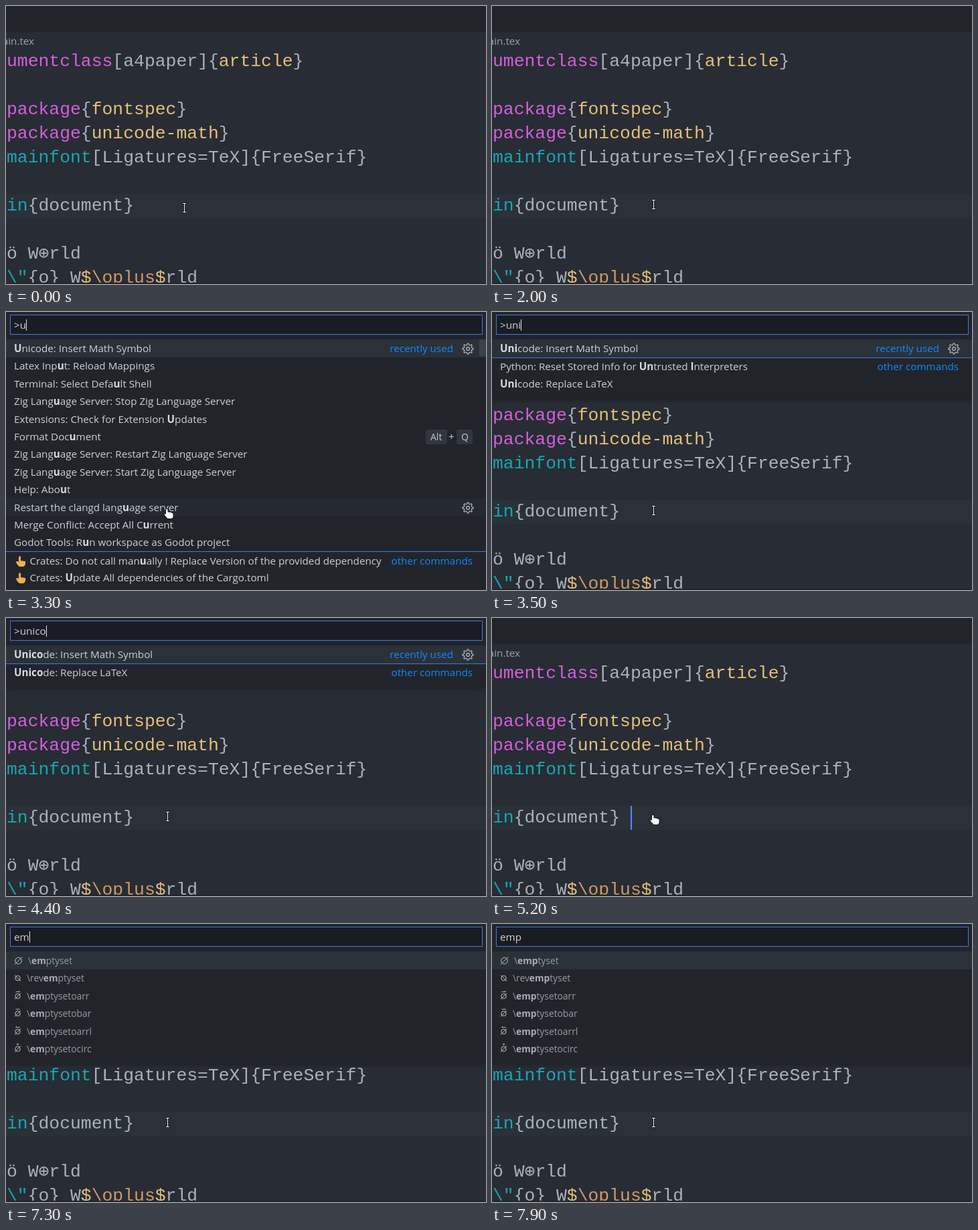
Animation of 717x416 px, one loop 8000 ms. Source, as an HTML page with a canvas:

```html
<!DOCTYPE html>
<html>
<head>
<meta charset="utf-8">
<style>
html, body { margin: 0; width: 100%; height: 100%; overflow: hidden; background: #282c34; }
canvas { display: block; }
</style>
</head>
<body>
<canvas id="stage" width="717" height="416"></canvas>
<script>
const ctx = document.getElementById('stage').getContext('2d');
const UI = '"Open Sans", "Noto Sans", "DejaVu Sans", sans-serif';
const MONO = '26.4px "Liberation Mono", "DejaVu Sans Mono", monospace';
const ROW = 26.4;
const GREY = '#abb2bf', PINK = '#d55fde', GOLD = '#e5c07b', TEAL = '#16a8b3', ORANGE = '#d19a66';
const BORDER = '#4677dc', LINK = '#128aff';

// Code lines: line number, then text and colour in turn
const code = [
  [0, 'umentclass', PINK, '[a4paper]{', GREY, 'article', GOLD, '}', GREY],
  [2, 'package', PINK, '{', GREY, 'fontspec', GOLD, '}', GREY],
  [3, 'package', PINK, '{', GREY, 'unicode-math', GOLD, '}', GREY],
  [4, 'mainfont', TEAL, '[Ligatures=TeX]{FreeSerif}', GREY],
  [6, 'in', TEAL, '{document}', GREY],
  [8, 'ö W⊕rld', GREY],
  [9, '\\"', TEAL, '{o} W', GREY, '$', GOLD, '\\oplus', ORANGE, '$', GOLD, 'rld', GREY]
];

const insert = 'Unicode: Insert Math Symbol', replace = 'Unicode: Replace LaTeX';
const python = 'Python: Reset Stored Info for Untrusted Interpreters';
const run = 'Godot Tools: Run workspace as Godot project';
const commands = [
  insert,
  'Latex Input: Reload Mappings',
  'Terminal: Select Default Shell',
  'Zig Language Server: Stop Zig Language Server',
  'Extensions: Check for Extension Updates',
  'Format Document',
  'Zig Language Server: Restart Zig Language Server',
  'Zig Language Server: Start Zig Language Server',
  'Help: About',
  'Restart the clangd language server',
  'Merge Conflict: Accept All Current',
  run,
  'Crates: Do not call manually ! Replace Version of the provided dependency',
  'Crates: Update All dependencies of the Cargo.toml'
];
const symbols = '´H ŁL ØO ¶P §S ¸c ˛k łl øo ˘u ÅAA ÆAE ÐDH ĐDJ'.split(' ');
const symbolsE = 'ÆAE ŒOE ℜRe æae ≥ge ≤le ≠ne œoe °deg ℓell ηeta ≥geq ≤leq ¬neg'.split(' ');
const empties = ['emptyset', 'revemptyset', 'emptysetoarr', 'emptysetobar', 'emptysetoarrl', 'emptysetocirc'];

// Time, palette input (null = closed), caret shown
const states = [
  [0, null, 0], [600, null, 1], [1100, null, 0], [1600, null, 1], [2000, null, 0],
  [2100, '>', 1], [2700, '>', 0], [3300, '>u', 1], [3400, '>un', 1], [3500, '>uni', 1],
  [4100, '>unic', 1], [4400, '>unico', 1], [4600, '>unicod', 1], [5100, '>unicod', 0],
  [5200, null, 1], [5300, '', 1], [5900, '', 0], [6400, '', 1],
  [7000, 'e', 1], [7300, 'em', 1], [7400, 'emp', 1], [7900, 'emp', 0]
];
const mouse = [
  [0, 266, 302], [400, 262, 345], [500, 250, 383], [600, 241, 313],
  [900, 241, 306], [1000, 241, 300], [1100, 241, 298], [1400, 241, 297]
];
const at = (list, t) => list.filter(s => s[0] <= t).pop();

function rect(x, y, w, h, color) {
  ctx.fillStyle = color;
  ctx.fillRect(x, y, w, h);
}

function text(str, x, y, color, font) {
  ctx.font = font || `15.2px ${UI}`;
  ctx.fillStyle = color;
  ctx.fillText(str, x, y);
  return x + ctx.measureText(str).width;
}

function textRight(str, x, y, color) {
  ctx.textAlign = 'right';
  text(str, x, y, color);
  ctx.textAlign = 'left';
}

function circle(x, y, r, color, width = 1) {
  ctx.strokeStyle = color;
  ctx.lineWidth = width;
  ctx.beginPath();
  ctx.arc(x, y, r, 0, 7);
  ctx.stroke();
}

function line(color, width, ...pts) {
  ctx.strokeStyle = color;
  ctx.lineWidth = width;
  ctx.beginPath();
  for (let i = 0; i < pts.length; i += 2) ctx.lineTo(pts[i], pts[i + 1]);
  ctx.stroke();
}

function shape(d, x, y, fill, outline) {
  const p = new Path2D(d);
  ctx.save();
  ctx.translate(x, y);
  if (outline) {
    ctx.strokeStyle = outline;
    ctx.lineWidth = 2;
    ctx.stroke(p);
  }
  ctx.fillStyle = fill;
  ctx.fill(p);
  ctx.restore();
}

// Draws a label with the matched parts in bold
function label(str, query, x, y, color, bold, size = 15.2) {
  const i = str.toLowerCase().indexOf(query);
  let parts = i < 0 || !query ? [str]
    : [str.slice(0, i), str.substr(i, query.length), str.slice(i + query.length)];
  if (str === python && query === 'uni') parts = str.split(/(Un|I(?=nterp))/);
  parts.forEach((p, k) => {
    x = text(p, x, y, k % 2 ? bold : color, `${k % 2 ? 700 : 400} ${size}px ${UI}`);
  });
}

function gear(y) {
  const c = '#c5c9d0', pts = [];
  for (let i = 0; i <= 32; i++) {
    const a = (i - 0.5) * Math.PI / 16, r = i % 4 < 2 ? 8 : 5.8;
    pts.push(690 + r * Math.cos(a), y + r * Math.sin(a));
  }
  line(c, 1.1, ...pts);
  circle(690, y, 2.4, c, 1.1);
}

function key(x, w, name, y) {
  ctx.fillStyle = '#31363e';
  ctx.beginPath();
  ctx.roundRect(x, y - 11, w, 22, 3);
  ctx.fill();
  text(name, x + 7, y + 5, '#c5c9d0', `14px ${UI}`);
}

function emptySet(kind, y) {
  const c = '#c0c4cb', x = kind ? 17.5 : 18.5, r = kind ? 3.7 : 4.8, d = kind === 1 ? -1 : 1;
  const s = r + 0.8, top = y - 6.5;
  circle(x, y, r, c);
  line(c, 1, x - s * d, y + s, x + s * d, y - s);
  if (kind === 5) circle(x, top - 0.5, 1.2, c, 0.8);
  else if (kind > 1) line(c, 0.9, x - 3, top, x + 3, top);
  const tip = kind === 2 ? 1 : kind === 4 ? -1 : 0;
  if (tip) line(c, 0.8, x + 1.5 * tip, top - 1.5, x + 3 * tip, top);
}

function commandRow(str, query, y, i, hovered) {
  const crate = str.startsWith('Crates');
  if (crate) shape('M4 9V1.5Q5.5 -1 7 1.5V7L14 8V12Q13 16 10 16H5Q1 13 0 9Q1 7 4 9Z', 15, y - 8, '#f2b04e');
  label(str, query, crate ? 35.5 : 12, y + 5, '#cdd1d8', '#d9dde3');
  if (i === 0) textRight('recently used', 668, y + 5, LINK);
  if (i === 0 || hovered) gear(y);
  if (str === 'Format Document') {
    key(627, 32, 'Alt', y);
    text('+', 661, y + 5, '#c5c9d0');
    key(673, 24, 'Q', y);
  }
}

function symbolRow(str, query, y, i) {
  const describe = (name, x) => label('\\' + name, query, x, y + 5, '#979ca5', '#a9aeb7', 13.8);
  if (empties.includes(str)) {
    emptySet(i, y);
    describe(str, i ? 31 : 33);
    return;
  }
  const mark = '´¸˛'.includes(str[0]);
  const end = text(str[0], mark ? 9 : 12, y + 5, '#cdd1d8');
  describe(str.slice(1), mark ? 19 : end + 6.8);
}

function listFor(input) {
  const n = input.length;
  if (input[0] !== '>') return [n > 1 ? empties : n ? symbolsE : symbols, -1];
  if (n < 3) return [commands, 12];
  if (n === 3) return [[insert, run, python, replace], 2];
  return [n === 4 ? [insert, python, replace] : [insert, replace], 1];
}

function palette(input, caret, hand) {
  const [rows, split] = listFor(input);
  const isCommand = input[0] === '>', full = rows.length > 13;
  const query = isCommand ? input.slice(1) : input;
  ctx.save();
  ctx.shadowColor = 'rgba(0,0,0,.36)';
  ctx.shadowBlur = 8;
  ctx.shadowOffsetY = 2;
  rect(0, 0, 717, full ? 416 : Math.round(50 + ROW * rows.length), '#21252b');
  ctx.restore();

  rect(6, 4, 706, 30, BORDER);
  rect(7, 5, 704, 28, '#191c22');
  const end = text(input, 12, 25, '#d0d4da');
  if (caret) rect(Math.round(end), 11, 1, 17, '#e4e6ea');

  rect(0, 41, 717, 27, '#2a3138');
  rows.forEach((row, i) => {
    const hovered = hand && i === 9;
    const y = Math.round(55 + ROW * i + (i === split ? 1 : 0));
    if (hovered) rect(0, 279, 717, 26, '#252932');
    if (i === split) {
      rect(0, Math.round(41.5 + ROW * i), 717, 1, BORDER);
      textRight('other commands', 697, y + 5, LINK);
    }
    if (isCommand) commandRow(row, query, y, i, hovered);
    else symbolRow(row, query, y, i);
  });
  if (full) rect(707, 41, 10, 25, '#3a434c');
}

function editor(caret) {
  rect(0, 0, 717, 416, '#282c34');
  rect(0, 0, 717, 39, '#21252b');
  rect(0, 281, 717, 36, '#2a3139');
  textRight('main.tex', 42, 58, '#a0a6b0');
  for (const [n, ...parts] of code) {
    let x = 1;
    for (let i = 0; i < parts.length; i += 2) x = text(parts[i], x, 90 + 36 * n, parts[i + 1], MONO);
  }
  rect(0, 414, 717, 2, '#21252b');
  if (caret) rect(207, 281, 2, 36, '#528bff');
}

function pointer(t, hand) {
  if (hand) {
    shape('M3 8V2Q3 1 4.2 1T5.5 2V5.5Q10 5 13.5 7.5V12Q13 15 11.5 15H5.5Q3 12.5 .8 9.5Q.5 7 3 9Z',
      236, 294, '#fff', '#15171b');
    return;
  }
  const [, x, y] = at(mouse, t);
  rect(x - 3, y - 8, 7, 3, '#15171b');
  rect(x - 1, y - 7, 3, 14, '#15171b');
  rect(x - 3, y + 5, 7, 3, '#15171b');
  rect(x - 2, y - 7, 5, 1, '#fff');
  rect(x, y - 7, 1, 14, '#fff');
  rect(x - 2, y + 6, 5, 1, '#fff');
}

function frame(now) {
  const t = now % 8000;
  const [, input, caret] = at(states, t);
  const hand = (t >= 2200 && t < 3400) || (t >= 5200 && t < 7300);
  editor(input === null && caret);
  if (input !== null) palette(input, caret, hand);
  pointer(t, hand);
}

let start;
function tick(now) {
  start ??= now;
  frame(now - start);
  requestAnimationFrame(tick);
}
requestAnimationFrame(tick);
</script>
</body>
</html>
```
